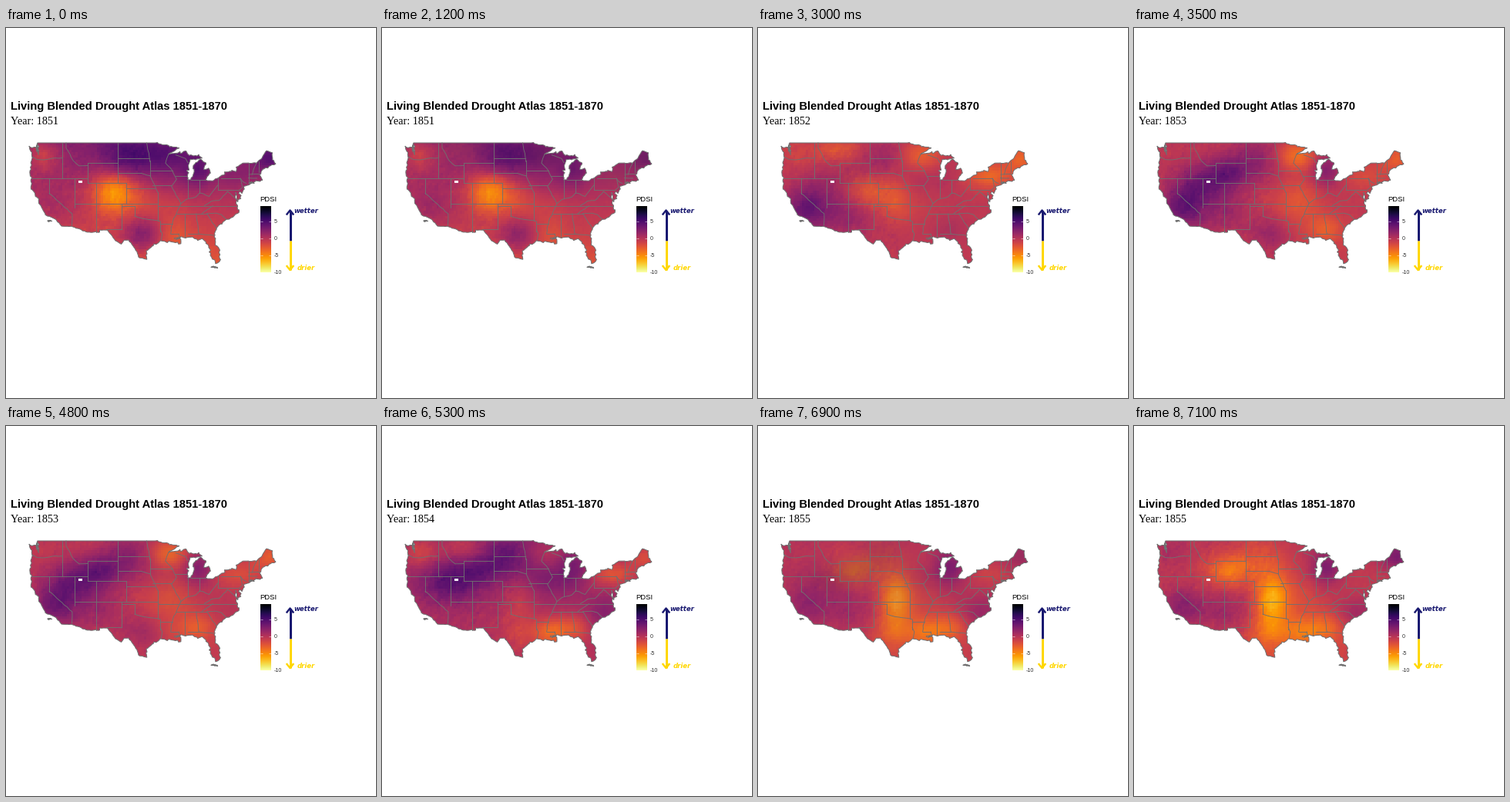
A matplotlib script for the animation above (8000 ms loop, 480 px wide and 480 px high).

```python
import numpy as np
import matplotlib.pyplot as plt
from matplotlib.animation import FuncAnimation
from matplotlib.patches import Polygon, Rectangle

SIZE, DPI = 480, 100
PT = 72 / DPI
STEP_MS, FRAMES = 100, 80
HOLD_STEPS, MORPH_STEPS = 12, 6
VMIN, VMAX = -10.2, 9.3
GREY, NAVY, GOLD = "#707070", "#191970", "#ffd700"

# Key points in degrees west and north; the coasts get their detail from roughen()
PACIFIC = [(122.75, 49), (122.4, 47.3), (123.1, 48.15), (124.7, 48.38), (124, 46.2),
           (124.5, 42.8), (124.1, 41), (124.3, 40.3), (122.5, 37.6), (121.9, 36.5),
           (120.6, 34.6), (118.4, 33.8), (117.12, 32.53)]
MEXICO = [(117.12, 32.53), (114.8, 32.5), (111.07, 31.33), (108.2, 31.33), (108.2, 31.78),
          (106.4, 31.75), (104.5, 29.65), (103.15, 28.97), (102.5, 29.75), (101.4, 29.77),
          (99.5, 27.5), (99.1, 26.4), (97.15, 25.95)]
GULF = [(97.15, 25.95), (97.3, 27.6), (94, 29.65), (91.3, 29.4), (89.2, 29.05), (89.5, 30.2),
        (86.5, 30.38), (85.3, 29.7), (84.2, 30.05), (82.7, 28.6), (82.6, 27.4), (81.1, 25.1),
        (80.2, 25.5)]
ATLANTIC = [(80.2, 25.5), (80.05, 26.9), (81.4, 30.4), (80.9, 32.1), (78.6, 33.85),
            (77.9, 33.9), (75.6, 35.25), (76.3, 37), (76.4, 39.2), (75.9, 37.3), (75.1, 38.6),
            (75.4, 39.4), (74.9, 39), (74, 40.5), (72, 41), (73.4, 41), (70.1, 41.6),
            (70.8, 42.7), (70, 43.8), (67, 44.85)]
CANADA = [(67, 44.85), (67.8, 45.7), (67.8, 47.05), (69.2, 47.45), (70.3, 45.9), (71.5, 45),
          (74.7, 45), (76.3, 44.2)]
LAKES = [(76.3, 44.2), (76.2, 43.5), (79, 43.27), (78.9, 42.8), (81.7, 41.5), (83.4, 41.7),
         (82.45, 42.95), (82.7, 44), (83.8, 43.7), (83.4, 45.1), (84.7, 45.75), (86.3, 44.5),
         (86.3, 42.8), (86.9, 41.7), (87.6, 41.7), (87.5, 44.5), (87, 45.75), (84.2, 46),
         (85, 46.7), (87.2, 46.5), (88, 47.4), (92.1, 46.75), (89.6, 48), (92.9, 48.6),
         (95.15, 49)]
SHORES = [(PACIFIC, 0.7), (MEXICO, 0.25), (GULF, 0.8), (ATLANTIC, 0.8), (CANADA, 0.3), (LAKES, 0.8)]

# Straight borders: latitude or longitude, then the span
PARALLELS = [(45.94, 104.05, 96.6), (45, 111.05, 104.05), (43, 104.05, 98.5), (43.5, 96.45, 91.2),
             (42, 124.2, 111.05), (42.5, 90.6, 87.8), (42, 79.8, 75.3), (41, 111.05, 102.05),
             (40.6, 95.8, 91.5), (41.75, 86.8, 83.4), (40, 102.05, 95.3), (39.72, 80.5, 75.8),
             (37, 114.05, 94.6), (36.5, 103, 100), (36.55, 94.6, 76), (35, 90.3, 83.1),
             (33, 94.04, 91.2), (32, 106.6, 103.05), (31, 91.6, 89.7), (31, 87.6, 85)]
MERIDIANS = [(120, 39, 42), (117.03, 42, 49), (114.05, 36.2, 42), (111.05, 41, 45),
             (109.05, 31.33, 41), (104.05, 41, 49), (103.03, 32, 37), (102.05, 37, 41),
             (100, 34.5, 36.5), (96.45, 42.5, 45.5), (94.6, 33.6, 39.2), (94.04, 31.5, 33.5),
             (88.3, 30.3, 35), (87.53, 38, 41.7), (84.8, 39.1, 41.7), (80.52, 39.7, 42),
             (73.4, 41, 45), (71.05, 43.2, 45.3)]
# Borders along rivers and ridges
WINDING = [
    [(124, 46.25), (122.8, 45.7), (121.2, 45.65), (119.3, 45.95), (117, 46)],
    [(116.05, 49), (116.05, 48), (114.4, 45.5), (113, 44.45), (111.05, 44.5)],
    [(120, 39), (114.63, 35), (114.7, 32.7)],
    [(100, 34.5), (98, 34), (94.04, 33.5)], [(94.04, 31.9), (93.55, 31), (93.8, 29.7)],
    [(94.6, 39.2), (96.4, 42.5), (98.5, 43)], [(97.2, 49), (96.6, 46.3), (96.45, 45.3)],
    [(92.1, 46.7), (92.8, 45), (91.2, 43.5), (90.2, 41.8), (91.4, 40.4), (89.2, 37),
     (91.1, 33.5), (91.6, 31)],
    [(89.7, 31), (89.5, 30.2)], [(90.4, 46.6), (88.1, 45.9), (87.6, 45.1)],
    [(89.2, 37), (88, 37.8), (85.7, 38.3), (84.8, 39.1), (82.6, 38.4), (80.6, 40.6)],
    [(83.7, 36.6), (82, 37.5), (80.3, 37.6), (78.3, 39.4), (76.4, 38)],
    [(81.7, 36.55), (84.3, 35)], [(85.6, 35), (85, 31), (81.5, 30.7)],
    [(83.1, 35), (80.9, 32.1)], [(83.1, 35), (81, 35.1), (79.7, 34.8), (78.6, 33.9)],
    [(75.3, 42), (74.7, 41.3), (73.9, 41)], [(75.2, 41.8), (74.8, 40.2), (75.6, 39.6)],
    [(73.4, 42.05), (71.4, 42)], [(73.3, 42.75), (70.8, 42.85)],
    [(72.5, 42.75), (72.2, 43.8), (71.5, 45)]]

# Centre and spread of each region in pixels
REGIONS = dict(
    northwest=(48, 165, 15, 15), california=(62, 235, 19, 18), basin=(87, 204, 26, 18),
    montana=(105, 158, 24, 12), wyoming=(122, 188, 20, 14), dakotas=(160, 170, 26, 20),
    minnesota=(210, 166, 20, 13), iowa=(215, 200, 24, 16), michigan=(248, 185, 14, 16),
    new_york=(300, 192, 22, 12), maine=(340, 170, 14, 12), colorado=(140, 213, 20, 19),
    kansas=(178, 224, 15, 24), desert=(115, 242, 26, 20), texas=(176, 268, 18, 16),
    missouri=(213, 225, 22, 22), louisiana=(217, 268, 16, 13), georgia=(248, 262, 16, 13),
    carolinas=(290, 243, 20, 16))
# Overall level, southward trend, and how far each region departs from them
YEARS = {
    1851: (0.2, -1.9, dict(
        northwest=-2.8, california=0.8, dakotas=3.4, minnesota=2, iowa=1, michigan=2.6, new_york=1,
        maine=2.8, colorado=-6.2, kansas=-1, texas=3.8, louisiana=-1.2, missouri=-1)),
    1852: (-0.6, 0, dict(
        northwest=-1, california=4, basin=0.8, montana=-2.4, dakotas=1.7, minnesota=-2.5, iowa=0.8,
        new_york=-3.2, maine=-2.8, colorado=-3, kansas=-2.2, desert=2.4, georgia=1.5)),
    1853: (-0.7, -0.2, dict(
        california=4, basin=3.6, wyoming=3, dakotas=2.2, minnesota=-3.6, michigan=3, new_york=-1.4,
        maine=-2.5, desert=1.8, texas=2, missouri=-1.9, georgia=-2.2)),
    1854: (0.7, -0.5, dict(
        northwest=-2.6, basin=3.4, montana=-2, wyoming=1.8, dakotas=2.8, minnesota=-1.4, iowa=1.6,
        michigan=1.8, new_york=-3.4, maine=-3, kansas=-1.4, texas=-1.4, louisiana=-3.6,
        georgia=-2.6, carolinas=1.6)),
    1855: (-0.9, -0.5, dict(
        northwest=0.8, california=2.8, wyoming=-3.4, dakotas=-1.6, michigan=3.2, maine=3.2,
        kansas=-5.6, desert=2, texas=-2.4, missouri=-1, louisiana=-2.8, georgia=-2.4,
        carolinas=1.8)),
}


def to_px(points):
    west, north = np.array(points, float).T
    return np.column_stack([30 + (124.7 - west) * 5.546, 149 + (49 - north) * 6.56])


def roughen(points, rng, amount, step=2.2):
    """Subdivide a pixel path and shake the new vertices."""
    out = [points[:1]]
    for a, b in zip(points[:-1], points[1:]):
        n = max(1, int(np.hypot(*(b - a)) / step))
        part = a + (b - a) * (np.arange(1, n + 1) / n)[:, None]
        part[:-1] += rng.normal(0, amount, (n - 1, 2))
        out.append(part)
    return np.concatenate(out)


def field_colors(year, x, y):
    level, trend, departures = YEARS[year]
    value = level + trend * (y - 215) / 60
    for name, height in departures.items():
        cx, cy, sx, sy = REGIONS[name]
        value = value + height * np.exp(-((x - cx) / sx) ** 2 / 2 - ((y - cy) / sy) ** 2 / 2)
    noise = np.random.default_rng(year).normal(0, 0.35, value.shape)
    noise = (noise + np.roll(noise, 1, 0) + np.roll(noise, 1, 1)) / 3
    value = value + noise * np.where(x < 180, 1, 0.4)
    return plt.cm.inferno(np.clip((VMAX - value) / (VMAX - VMIN), 0, 1))[..., :3]


fig = plt.figure(figsize=(SIZE / DPI, SIZE / DPI), dpi=DPI, facecolor="white")
ax = fig.add_axes([0, 0, 1, 1])
ax.axis("off")


def line(points, color=GREY, width=0.9, **kw):
    x, y = np.array(points).T
    ax.plot(x, y, color=color, lw=width * PT, **kw)


def text(x, y, label, px, family="Liberation Sans", **kw):
    return ax.text(x, y, label, fontsize=px * PT, family=family, **kw)


def image(data, left, right, top, bottom, **kw):
    return ax.imshow(data, extent=(left, right, bottom, top), aspect="auto",
                     interpolation="nearest", **kw)


def arrow(tip, tail, color):
    back = 5 if tail > tip else -5
    line([(368.5, tail), (368.5, tip)], color, 3, solid_capstyle="butt")
    line([(364.5, tip + back), (368.5, tip), (372.5, tip + back)], color, 2.4)


# Half-degree tiles clipped to the coast
COLS, ROWS, TILE_W, TILE_H, LEFT, TOP = 117, 51, 2.773, 3.28, 28.6, 145.7
tile_x, tile_y = np.meshgrid(LEFT + TILE_W * (np.arange(COLS) + 0.5),
                             TOP + TILE_H * (np.arange(ROWS) + 0.5))
colors = [field_colors(year, tile_x, tile_y) for year in YEARS]
tiles = image(colors[0], LEFT, LEFT + COLS * TILE_W, TOP, TOP + ROWS * TILE_H)

rng = np.random.default_rng(4)
outline = np.concatenate([roughen(to_px(shore), rng, amount) for shore, amount in SHORES])
land = Polygon(outline, closed=True, fc="none", ec=GREY, lw=PT, zorder=3)
ax.add_patch(land)
tiles.set_clip_path(land)

for lat, west, east in PARALLELS:
    line(to_px([(west, lat), (east, lat)]))
for lon, south, north in MERIDIANS:
    line(to_px([(lon, south), (lon, north)]))
for border in WINDING:
    line(roughen(to_px(border), rng, 0.25, 4))
# Puget Sound, Lake Pontchartrain, the Keys and the Channel Islands
for x, y, rx, ry in ((40, 157, 2, 5), (223, 273, 4, 2), (271, 310, 4, 1), (57, 250, 3, 1)):
    line(np.array([x, y]) + rng.normal(0, 0.6, (14, 2)) * (rx, ry))
ax.add_patch(Rectangle((94, 198), 5, 3, fc="white", ec="none", zorder=3))

text(6, 106, "Living Blended Drought Atlas 1851-1870", 14.78, weight="bold")
year_label = text(6, 125, "", 14.2, family="Liberation Serif")

text(329, 224.7, "PDSI", 9.5)
image(np.linspace(0, 1, 86)[:, None], 330, 344, 231, 317, cmap="inferno")
for tick in (5, 0, -5, -10):
    tick_y = 272.5 - tick * 4.4
    for x in (330, 341):
        line([(x, tick_y), (x + 3, tick_y)], "white", 0.5, solid_capstyle="butt")
    text(348, tick_y + 2.6, str(tick), 7.2, color="#303030")

arrow(236.5, 276, NAVY)
arrow(314, 276, GOLD)
for x, y, label, color in ((373.5, 239.5, "wetter", NAVY), (377.5, 314, "drier", GOLD)):
    text(x, y, label, 8.5, color=color, family="DejaVu Sans", weight="bold", style="italic")
ax.set(xlim=(0, SIZE), ylim=(SIZE, 0))


def update(frame):
    # Each year holds, then blends into the next in even steps
    year, step = divmod(frame, HOLD_STEPS + MORPH_STEPS)
    mix = max(0, step - HOLD_STEPS + 1) / MORPH_STEPS
    after = min(year + 1, len(colors) - 1)
    tiles.set_data(colors[year] * (1 - mix) + colors[after] * mix)
    year_label.set_text(f"Year: {1851 + (after if mix >= 0.5 else year)}")
    return tiles, year_label


animation = FuncAnimation(fig, update, frames=FRAMES, interval=STEP_MS, repeat=True,
                          repeat_delay=0, blit=False)
plt.show()
```
